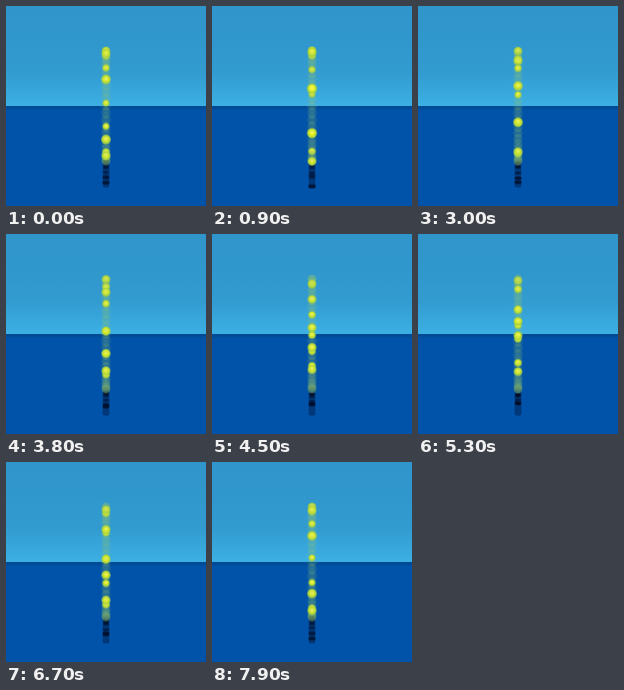
Recreate the animation shown at these times as an HTML page with a canvas. Size 250 by 250 pixels, loop 8 s.

```html
<!DOCTYPE html>
<html>
<head>
<meta charset="utf-8">
<style>
html, body { margin: 0; width: 100%; height: 100%; overflow: hidden; }
canvas { display: block; width: 250px; height: 250px; }
</style>
</head>
<body>
<canvas id="stage" width="250" height="250"></canvas>
<script>
const ctx = document.getElementById('stage').getContext('2d');
const { sin, cos, PI } = Math;
const LOOP = 8000, STEP = 100, SQUEEZE_TIME = 5300;
const CENTER = 125, RADIUS = 68, DEPTH = 0.2, GROUND = 81, BEAD = 5.2;
const BEADS = 10, GHOSTS = 60;

function verticalGradient(top, bottom, ...colors) {
  const gradient = ctx.createLinearGradient(0, top, 0, bottom);
  colors.forEach((color, i) => gradient.addColorStop(i / (colors.length - 1), color));
  return gradient;
}
const sky = verticalGradient(0, CENTER, '#3095cb', '#3097cd', '#329bd0', '#3cb0e4');
const sea = verticalGradient(CENTER, CENTER + 6, '#00478f', '#0053a8');

// A point on a ring seen edge-on; angle from the top, positive = near side.
function project(angle, flatness = 1) {
  const z = sin(angle) * flatness, scale = 1 / (1 - DEPTH * z);
  return { z, scale, y: CENTER - RADIUS * cos(angle) * scale };
}

// Evenly spread beads sway on their own and are squeezed together to both sides.
function beadsAt(t) {
  const phase = 2 * PI * t / LOOP;
  const squeeze = cos(phase - 2 * PI * SQUEEZE_TIME / LOOP);
  return Array.from({ length: BEADS }, (_, i) => {
    const rest = (32 * i - 147) * PI / 180;
    const sway = 0.13 * sin((2 + i % 3) * phase + i * i);
    return project(rest + 0.31 * squeeze * sin(2 * rest) + sway, 0.7 - 0.35 * squeeze);
  });
}

const ghosts = Array.from({ length: GHOSTS }, (_, i) =>
  ({ ...project(2 * PI * i / GHOSTS), ghost: true }));

function ellipse(y, rx, ry, color) {
  ctx.fillStyle = color;
  ctx.beginPath();
  ctx.ellipse(CENTER, y, rx, ry, 0, 0, 2 * PI);
  ctx.fill();
}

function drawShadow({ scale }) {
  ellipse(CENTER + GROUND * scale, 3.7 * scale, 1.9 * scale, 'rgba(0,12,38,.5)');
}

function drawBead({ y, scale, ghost }) {
  const r = BEAD * scale;
  if (ghost) return ellipse(y, r, r, 'rgba(150,200,110,.12)');
  const glow = ctx.createRadialGradient(CENTER, y - r * 0.2, 0, CENTER, y, r);
  glow.addColorStop(0, '#f8fa68');
  glow.addColorStop(0.5, '#e4f020');
  glow.addColorStop(1, 'rgba(155,205,65,.7)');
  ellipse(y, r, r, glow);
}

function draw(t) {
  ctx.fillStyle = sky;
  ctx.fillRect(0, 0, 250, CENTER);
  ctx.fillStyle = sea;
  ctx.fillRect(0, CENTER, 250, CENTER);

  ctx.fillStyle = 'rgba(0,25,65,.45)';
  ctx.beginPath();
  ctx.roundRect(120.8, 190, 8.4, 37, 3);
  ctx.fill();

  const beads = beadsAt(t);
  beads.forEach(drawShadow);
  [...ghosts, ...beads].sort((a, b) => a.z - b.z).forEach(drawBead);
}

function frame() {
  draw(Math.floor(performance.now() % LOOP / STEP) * STEP);
  requestAnimationFrame(frame);
}
frame();
</script>
</body>
</html>
```
